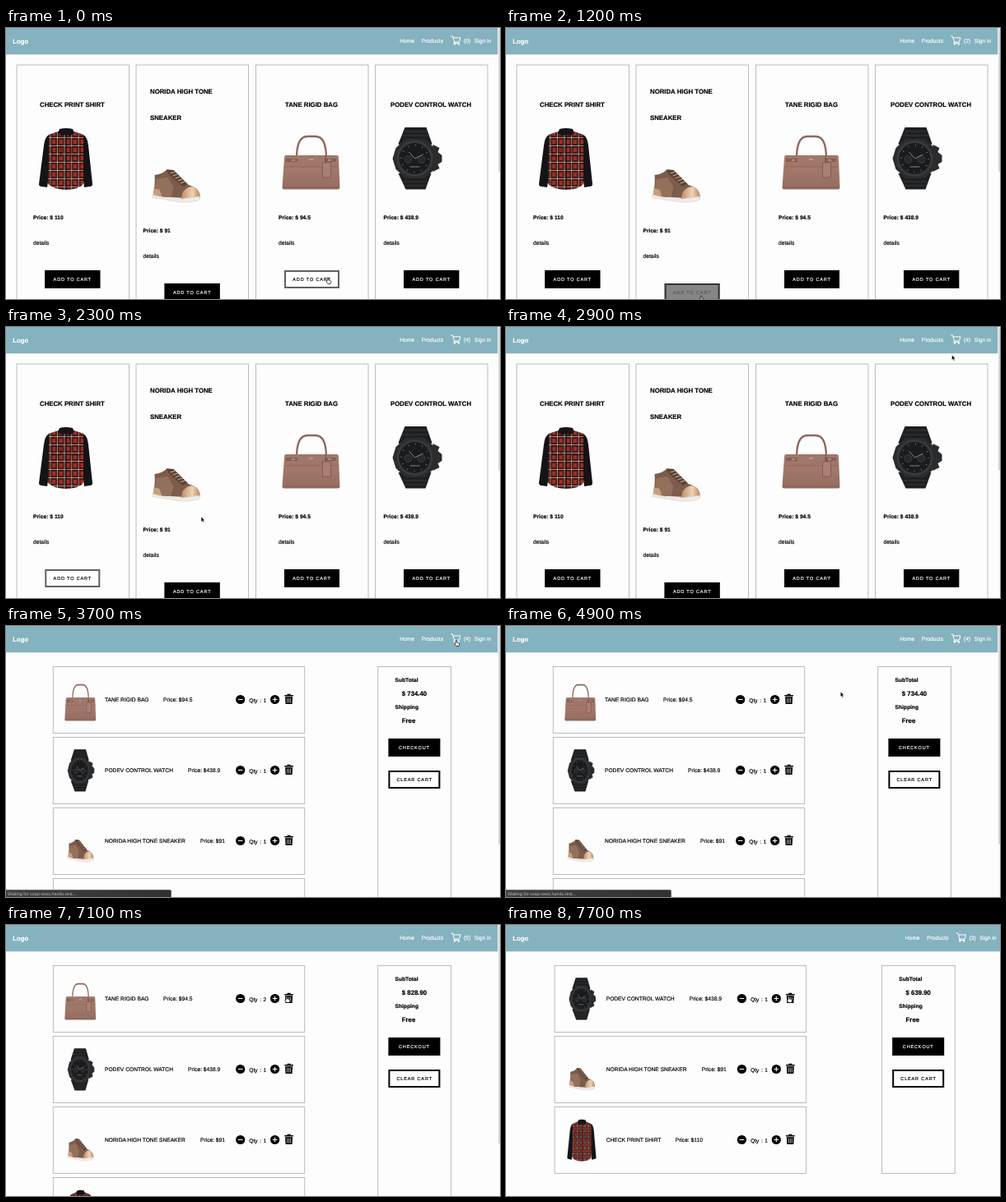
An HTML page that plays this animation: 600 by 330 pixels, repeating every 8 s.

```html
<!DOCTYPE html>
<html lang="en">
<head>
<meta charset="utf-8">
<title>Shop</title>
<style>
  html, body { margin: 0; width: 100%; height: 100%; overflow: hidden; background: #fdfdfd; }
  svg { display: block; width: 600px; height: 330px; }
  text { font-family: "Liberation Sans", Arial, sans-serif; font-size: 6.67px; text-rendering: geometricPrecision; white-space: pre; stroke-width: .17px; }
  .b { font-weight: 700; }
  .h { font-weight: 700; font-size: 7.8px; }
  .btn { font-size: 5.556px; letter-spacing: .833px; }
</style>
</head>
<body>
<svg viewBox="0 0 600 330">
  <defs>
    <pattern id="plaid" width="8.6" height="10" x="-4.3" y="2" patternUnits="userSpaceOnUse">
      <path fill="#a82b25" d="M0 0h8.600v10H0z"/>
      <path fill="#15130f" fill-opacity=".68" d="M0 0h4.600v10H0zM0 0h8.600v5H0z"/>
      <path stroke="#e0d8d0" stroke-opacity=".7" stroke-width=".8" d="M2.300 0v10M0 2.500h8.600"/>
    </pattern>
    <linearGradient id="leather" x2="0" y2="1">
      <stop stop-color="#ab8073"/><stop offset="1" stop-color="#956c60"/>
    </linearGradient>
    <linearGradient id="gold">
      <stop stop-color="#b98a68"/><stop offset=".6" stop-color="#efd3b5"/><stop offset="1" stop-color="#b88a63"/>
    </linearGradient>
    <linearGradient id="bubble">
      <stop stop-color="#414141"/><stop offset="1" stop-color="#303030"/>
    </linearGradient>

    <g id="shirt">
      <path fill="#141417" d="M-9-33-21-29Q-26-26-27-16L-33 31Q-33 34-30 34L-23 35-18 4H18L22 35 29 34Q32 34 32 31L27-16Q26-26 21-29L9-33Z"/>
      <path fill="url(#plaid)" d="M-9-33-21-29Q-21-8-22 30-18 37 0 38 18 37 21 30 21-8 21-29L9-33 0-28Z"/>
      <path fill="#17151a" d="M-8-36Q0-38 8-36L10-31 4-27 0-32-4-27-10-31Z"/>
      <path stroke="#1d1416" stroke-width="1.200" d="M0-29V38"/>
      <path fill="none" stroke="#1d1416" stroke-width=".7" d="M6-14h11v11H6zM-17-14h11v11h-11z"/>
    </g>

    <g id="sneaker">
      <path fill="#7c5c4b" d="M-26 4Q-17 3-11-2.500L-3-2 4 5 15 16Q27 19 29 28V33L-28 30Q-25 16-26 4Z"/>
      <path fill="#93705b" d="M-24 9-10 7-3 19-6 31-26 28Z"/>
      <path fill="#5d4236" d="M-12-2.500-3-2 14 15 8 18-8 4Z"/>
      <path stroke="#d8c2ad" stroke-width=".9" d="M-7 2-1 0M-4 5 2 3M-1 8 5 6M2 11 8 9M5 14 11 12"/>
      <path fill="url(#gold)" d="M8 25Q15 16 22 19 29 22 29 32L6 33Z"/>
      <path fill="#c79f7d" d="M-27 20-20 22-17 31-28 30Z"/>
      <path fill="#f1ece7" stroke="#cfc8c0" stroke-width=".5" d="M-28.500 28Q-8 34 8 33L29 30Q30 33 27 35 16 38 5 37L-28.500 31.500Z"/>
    </g>

    <g id="bag">
      <path fill="none" stroke="#8f675b" stroke-width="2.300" d="M-18 0C-18-18-14-27-5-27H5C14-27 18-18 18 0"/>
      <path fill="url(#leather)" d="M-31-4H31Q33-4 33-1L34.500 35Q34.500 37.500 32 37.500H-33Q-35.500 37.500-35.500 35L-33-1Q-33-4-31-4Z"/>
      <path fill="#a0776b" d="M-31-4H31L33 10H-33Z"/>
      <path stroke="#73503f" stroke-opacity=".6" stroke-width=".8" d="M-33 10H33M-35 35H34"/>
      <path fill="#855f54" d="M-31 0h14v4h-14zM16 0h14v4H16z"/>
      <path stroke="#d8bb9a" d="M-24 2h4M20 2h4M-3 1h5"/>
      <path stroke="#74503f" stroke-width=".9" d="M17-4 18 5"/>
      <path fill="#a98073" stroke="#6f4f45" stroke-width=".7" d="M13.500 5h10v18h-10z"/>
    </g>

    <g id="watch">
      <path fill="#1e1f21" d="M-14-38H12L19-18-2 0-22-18ZM-22 18H18L11 37.500H-13Z"/>
      <path stroke="#36383b" d="M-14-33H13M-17-28H15M-16 28H13M-14 33H11"/>
      <path fill="#2a2b2d" d="M20-17 28-13 26-8 31-4V4L26 7 28 12 20 16Z"/>
      <path fill="#2b2c2e" d="M-13-24H10L22-13 25 0 22 13 10 24H-13L-25 13-29 0-25-13Z"/>
      <circle cx="-2" r="22" fill="#38393c"/>
      <circle cx="-2" r="19" fill="#1a1b1d"/>
      <circle cx="-2" r="16.500" fill="none" stroke="#7b7d80" stroke-width="1.800" stroke-dasharray=".8 7.840"/>
      <circle cx="-10" cy="1" r="4.500" fill="#26282a" stroke="#4b4d51" stroke-width=".6"/>
      <circle cx="6" cy="1" r="4.500" fill="#26282a" stroke="#4b4d51" stroke-width=".6"/>
      <path stroke="#8f8676" d="M-2 0 8-5M-2 0-9-8"/>
      <path stroke="#5c5f63" stroke-width="1.500" d="M-8 10H4"/>
    </g>

    <g id="cart" fill="none" stroke="#fff" stroke-width="1">
      <path d="M0 .5H2.200L4.200 7.500H10.200L11.700 2.400H2.800M4.200 7.500 3.600 9H10.500"/>
      <circle cx="4.600" cy="10.300" r=".8"/><circle cx="9.600" cy="10.300" r=".8"/>
    </g>
    <g id="trash">
      <path d="M-5.300-5.300H-2V-6.500H2V-5.300H5.300V-3.700H-5.300ZM-4.500-3H4.500L4 5.800H-4Z"/>
      <path stroke="#fdfdfd" stroke-width=".7" d="M-2-1.500V4.300M0-1.500V4.300M2-1.500V4.300"/>
    </g>
    <path id="arrow" stroke="#fff" stroke-width=".5" d="M0 0V6.300L1.500 5 2.600 7.300 3.600 6.800 2.600 4.600H4.500Z"/>
    <path id="hand" fill="#fff" stroke="#000" stroke-width=".7" d="M-.8 4.300V1Q-.8 0 0 0T.8 1V3Q3.700 3 3.800 4.400 3.800 6.400 3 7.600H0Q-1.600 5.800-2.300 4.400-2 3.400-.8 4.300Z"/>
  </defs>
  <g id="stage"></g>
</svg>
<script>
const LOOP = 8000, TICK = 100;
const CART_OPENS = 3300, QTY_UP = 6200, REMOVED = 7500;

// hover: [start, end] of the button's highlighted state
const products = [
  { art: 'shirt', lines: ['CHECK PRINT SHIRT'], price: '110', card: 13, title: 41, left: 33, btn: 47.3, hover: [1700, 2300], costX: 204 },
  { art: 'sneaker', lines: ['NORIDA HIGH TONE', 'SNEAKER'], price: '91', card: 158, title: 175, left: 166.5, btn: 192.6, hover: [1100, 1600], costX: 236 },
  { art: 'bag', lines: ['TANE RIGID BAG'], price: '94.5', card: 303.5, title: 339, left: 331, btn: 338, hover: [-400, 400], costX: 191 },
  { art: 'watch', lines: ['PODEV CONTROL WATCH'], price: '438.9', card: 448.5, title: 467, left: 458.5, btn: 483.2, hover: [600, 900], costX: 221 },
];
const [shirt, sneaker, bag, watch] = products;

const counts = [[0, 0], [100, 1], [900, 2], [1400, 3], [2000, 4], [QTY_UP, 5], [REMOVED, 3]];

// time, x, y, pointer shape (1 = hand)
const path = [
  [0, 391, 304, 1], [400, 391, 304, 1], [500, 400, 305, 1], [600, 455, 307, 0], [700, 508, 306, 1],
  [900, 510, 306, 1], [1000, 400, 318, 0], [1100, 260, 325, 1], [1200, 237, 326, 1], [1500, 235, 325, 1],
  [1600, 175, 318, 0], [1700, 95, 308, 1], [2000, 83, 305, 1], [2100, 92, 302, 1], [2200, 160, 270, 0],
  [2300, 237, 231, 0], [2600, 430, 110, 0], [2900, 541.5, 34, 0], [3100, 547, 17, 1], [4100, 547, 17, 1],
  [4200, 542, 24, 0], [4600, 470, 62, 0], [5000, 385, 86, 0], [5500, 333, 89, 0], [5700, 327.5, 87, 1],
  [6400, 327.5, 87, 1], [6800, 341, 87, 1], [7100, 341, 87, 1], [7300, 343.5, 87, 1], [8000, 343.5, 87, 1],
];

const clamp = v => Math.min(1, Math.max(0, v));
const gray = v => { const c = Math.round(255 * clamp(v)); return `rgb(${c},${c},${c})`; };
const text = (x, y, s, cls = '', fill = '#000') => `<text x="${x}" y="${y}" class="${cls}" fill="${fill}" stroke="${fill}">${s}</text>`;
const rect = (x, y, w, h, fill, extra = '') => `<rect x="${x}" y="${y}" width="${w}" height="${h}" fill="${fill}" ${extra}/>`;
const frame = (x, y, w, h) => rect(x, y, w, h, 'none', 'stroke="#b3b5b7" stroke-width=".9"');
const use = (id, x, y, scale = '1') => `<use href="#${id}" transform="translate(${x} ${y}) scale(${scale})"/>`;
const shift = (dx, s) => `<g transform="translate(${dx} 0)">${s}</g>`;

function cursor(t) {
  const i = path.findLastIndex(p => p[0] <= t);
  const a = path[i], b = path[i + 1] || a;
  const k = b === a ? 0 : (t - a[0]) / (b[0] - a[0]);
  return use(a[3] ? 'hand' : 'arrow', a[1] + (b[1] - a[1]) * k, a[2] + (b[2] - a[2]) * k);
}

function header(t, wide) {
  const count = counts.findLast(c => c[0] <= t)[1];
  const nav = text(478.3, 17.8, 'Home', '', '#fff') + text(504.7, 17.8, 'Products', '', '#fff') +
    use('cart', 540.3, 9.5) + text(556, 17.8, `(${count})`, '', '#fff') + text(568.8, 17.8, 'Sign in', '', '#fff');
  const w = wide ? 600 : 597.5;
  return rect(0, 32, w, 1, '#e3eaec') + rect(0, 0, w, 32, '#84b2bf') +
    text(8.3, 18.5, 'Logo', 'h', '#fff') + shift(wide ? 6.5 : 0, nav);
}

function addButton(x, y, mix) {
  const edge = rect(x + 1, y + 1, 65, 20, 'none', `stroke="${gray(mix * .38)}" stroke-width="2"`);
  return rect(x, y, 67, 22, gray(mix)) + edge +
    text(x + 10.3, y + 13, 'ADD TO CART', 'btn', gray(1 - mix * 1.25));
}

function card(p, t) {
  const drop = 16 * (p.lines.length - 1);
  const mix = Math.min(clamp((t - p.hover[0]) / 190), 1 - clamp((t - p.hover[1]) / 190));
  return frame(p.card, 45, 136.5, 300) +
    p.lines.map((s, i) => text(p.title, 96 - drop + 31.7 * i, s, 'h')).join('') +
    use(p.art, p.left + 40, 159 + drop) +
    text(p.left, 232.6 + drop, `Price: $ ${p.price}`, 'b') +
    text(p.left, 264.3 + drop, 'details') +
    addButton(p.btn, 295 + drop, mix);
}

function row(p, i, qty) {
  const y = 90 + 86 * i;
  const round = (x, upright) => `<circle cx="${x}" cy="${y - .5}" r="5.6"/>` +
    `<path stroke="#fff" stroke-width="1.1" d="M${x - 2.8} ${y - .5}h5.6${upright}"/>`;
  return frame(57.3, y - 40.5, 305.4, 81) + use(p.art, 90.5, y, '.54 .68') +
    text(120, y + 2.3, p.lines.join(' ')) + text(p.costX, y + 2.3, `Price: $${p.price}`) +
    round(284.7, '') + text(295.3, y + 2.7, 'Qty') + text(308.3, y + 2.7, ':') + text(312.5, y + 2.7, qty) +
    round(326.6, 'm-2.8-2.8v5.6') + use('trash', 343.6, y - .7);
}

function summary(total, rows) {
  return frame(451.7, 49.5, 88.8, 86 * rows - 5) +
    text(472.5, 68, 'SubTotal', 'b') + text(480.8, 85, `$ ${total.toFixed(2)}`, 'h') +
    text(472.5, 101.4, 'Shipping', 'b') + text(480.8, 118.2, 'Free', 'h') +
    rect(464.4, 137, 63, 22, '#000') + text(477, 149.9, 'CHECKOUT', 'btn', '#fff') +
    rect(465.4, 177, 61, 20, '#fdfdfd', 'stroke="#000" stroke-width="2"') + text(474.5, 188.9, 'CLEAR CART', 'btn');
}

function cartPage(t) {
  const removed = t >= REMOVED;
  const items = removed ? [watch, sneaker, shirt] : [bag, watch, sneaker, shirt];
  const qtyOf = p => p === bag && t >= QTY_UP ? 2 : 1;
  const total = items.reduce((sum, p) => sum + p.price * qtyOf(p), 0);
  return shift(removed ? 1.7 : 0, items.map((p, i) => row(p, i, qtyOf(p))).join('')) +
    shift(removed ? 4.8 : 0, summary(total, items.length));
}

function status(t) {
  const alpha = t < CART_OPENS ? 0 : 1 - clamp((t - 4900) / 300);
  return `<g opacity="${alpha}">` + rect(-2, 321.3, 202.7, 12, 'url(#bubble)', 'rx="1.5"') +
    `<text x="2" y="327.5" fill="#b5b5b5" style="font-size:5.4px">Waiting for soap-rows.handu.test...</text></g>`;
}

function scene(t) {
  const inCart = t >= CART_OPENS, wide = t >= REMOVED;
  const scrollbar = wide ? '' : rect(597.5, 0, 2.5, 330, '#fafafa') +
    rect(598.4, 1, 1.3, inCart ? 265 : 174, '#c8c8c8', 'rx=".6"');
  return rect(0, 0, 600, 330, '#fdfdfd') +
    (inCart ? cartPage(t) : products.map(p => card(p, t)).join('')) +
    header(t, wide) + scrollbar + status(t) + cursor(t);
}

const stage = document.getElementById('stage');
let shown = -1;
function draw() {
  const t = Math.floor(performance.now() % LOOP / TICK) * TICK;
  if (t !== shown) stage.innerHTML = scene(shown = t);
  requestAnimationFrame(draw);
}
draw();
</script>
</body>
</html>
```
